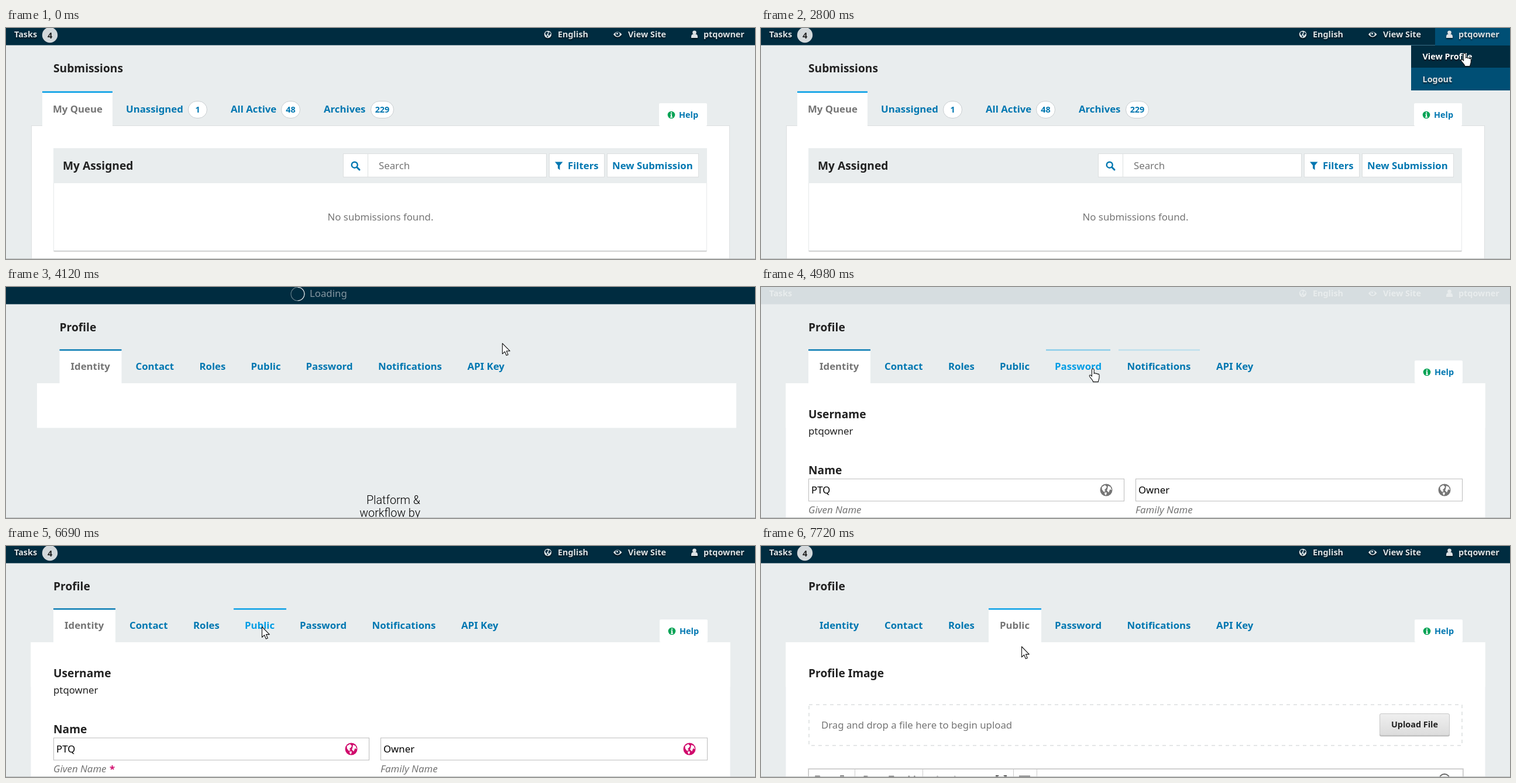
Write an HTML page that moves like this. It is 1280 px wide and 396 px high and loops after 8 s.

```html
<!DOCTYPE html>
<html lang="en">
<head>
<meta charset="utf-8">
<title>Profile settings</title>
<style>
html, body { margin: 0; width: 100%; height: 100%; overflow: hidden; background: #e9edee; }
svg { display: block; width: 1280px; height: 396px; font: 16.8px "Noto Sans", sans-serif; }
text { white-space: pre; }
.b { font-weight: 700; }
.h { font-weight: 700; font-size: 19.2px; fill: #222; }
.s { font-weight: 700; font-size: 14.4px; }
.i { font-style: italic; }
.nav { filter: drop-shadow(0 2px 1px #0009); }
</style>
</head>
<body>
<svg id="stage" viewBox="0 0 1280 396"></svg>
<script>
const LOOP = 8000;
const NAVY = '#002c40', MENU = '#004f75', BLUE = '#0077b1', BRIGHT = '#009de5';
const PAGE = '#e9edee', GREY = '#757575', DARK = '#222', PINK = '#d00a6c', PALE = '#dde2e5';
const USER = 'ptqowner', GIVEN = 'PTQ', FAMILY = 'Owner';

const text = (x, y, s, cls = '', fill = DARK, more = '') =>
  `<text x="${x}" y="${y}" class="${cls}" ${cls === 'h' ? '' : `fill="${fill}"`} ${more}>${s}</text>`;
const rect = (x, y, w, h, fill, more = '') =>
  `<rect x="${x}" y="${y}" width="${w}" height="${h}" fill="${fill}" ${more}/>`;
const path = (d, fill, more = '') => `<path d="${d}" fill="${fill}" ${more}/>`;
const group = (id, inner, more = '') => `<g id="${id}" ${more}>${inner}</g>`;
const outlined = (x, y, w, h, color = '#dcdfe0', fill = '#fff', more = '') =>
  rect(x + .5, y + .5, w - 1, h - 1, fill, `stroke="${color}" ${more}`);

const globe = (x, y, r, fill, land, cls = '') =>
  `<g transform="translate(${x} ${y}) scale(${r / 10})"><circle r="10" fill="${fill}" class="${cls}"/>` +
  path('M-7-5L-2-8 1-5-1-2-3 0-1 2-4 3-7-1ZM3-7L7-5 9 0 6-1 4 4 1 1 2-2ZM-3 4L1 4 0 8-2 8Z', land) + '</g>';

const help = (x, y) => rect(x, y, 82, 39, '#fff', 'rx="2"') +
  `<circle cx="${x + 21}" cy="${y + 20}" r="6.3" fill="#04a355"/>` +
  path(`M${x + 19.5} ${y + 18.5}h2.6v4.6h1v1.6h-4v-1.6h1v-3h-.6ZM${x + 20} ${y + 15.5}h2.2v2h-2.2Z`, '#fff') +
  text(x + 34, y + 25, 'Help', 's', BLUE);

const pill = (x, w, n) => outlined(x, 125, w, 30, '#c9ced1', '#fff', 'rx="14.5"') +
  text(x + w / 2, 145, n, 's', BLUE, 'text-anchor="middle"');

const navItems = text(14, 16, 'Tasks', 's', PALE) +
  globe(926, 11, 6.2, PALE, NAVY) + text(943, 16, 'English', 's', PALE) +
  path('M1038 11Q1045 2 1052.500 11Q1045 20 1038 11Z', PALE) +
  `<circle cx="1045.200" cy="10.500" r="3.600" fill="${NAVY}"/><circle cx="1044.500" cy="9.500" r="1.500" fill="${PALE}"/>` +
  text(1063, 16, 'View Site', 's', PALE) +
  `<circle cx="1176.500" cy="7.800" r="3.300" fill="${PALE}"/>` +
  path('M1171 17v-2q0-4 3-4.500h5q3 .5 3 4.500v2Z', PALE) +
  text(1192, 16, USER, 's', PALE);

const header = group('header', rect(0, 0, 1280, 29.5, NAVY) +
  group('userBg', rect(1152, 0, 128, 30, MENU)) +
  `<g class="nav">${navItems}</g>` +
  group('badge', `<circle cx="75" cy="12" r="13.2" fill="#d3d8db"/>` +
    text(75, 17.5, '4', 's', DARK, 'text-anchor="middle"')));

const menu = group('menu', rect(1111, 29.5, 169, 77.5, MENU) +
  group('menuHover', rect(1111, 30, 169, 38, NAVY)) +
  `<g class="nav">${text(1130.5, 54, 'View Profile', 's', PALE, 'id="viewProfile"')}` +
  text(1130.5, 93, 'Logout', 's', PALE) + '</g>');

const queue = group('queue',
  text(81, 76, 'Submissions', 'h') +
  outlined(43, 167, 1194, 240) +
  rect(62, 109, 120, 60, '#fff') + rect(62, 108.5, 120, 2.5, BRIGHT) +
  text(80, 145, 'My Queue', 'b', GREY) +
  text(205, 145, 'Unassigned', 'b', BLUE) + pill(311, 33, 1) +
  text(384, 145, 'All Active', 'b', BLUE) + pill(470, 33, 48) +
  text(543, 145, 'Archives', 'b', BLUE) + pill(623, 40, 229) +
  help(1116, 129) +
  rect(81, 208, 1117, 175.5, '#ccc', 'rx="2"') +
  outlined(81, 206, 1117, 176, '#e6e9ea') + rect(81, 206, 1117, 60, PAGE) +
  text(97, 243, 'My Assigned', 'h') +
  outlined(576, 215, 348, 41) + rect(618, 216, 1, 39, '#dcdfe0') +
  `<circle cx="595.700" cy="234.700" r="5" fill="none" stroke="${BLUE}" stroke-width="2.400"/>` +
  path('M599.500 238.500l4.500 4.500', 'none', `stroke="${BLUE}" stroke-width="3" stroke-linecap="round"`) +
  text(637, 242, 'Search', '', GREY) +
  outlined(928, 215, 95, 41) +
  path('M938 229.500h13.500l-5 6v8l-3.500-3v-5Z', BLUE) + text(960, 242, 'Filters', 'b', BLUE) +
  outlined(1027, 215, 157, 41) + text(1036, 242, 'New Submission', 'b', BLUE) +
  text(640, 330, 'No submissions found.', '', GREY, 'text-anchor="middle"'));

// name, text x, tab left, tab right
const TABS = [
  ['Identity', 100, 81, 187], ['Contact', 211], ['Roles', 320], ['Public', 408, 389, 479],
  ['Password', 502, 487, 597], ['Notifications', 625.5, 611, 750], ['API Key', 778]
];

const input = (x, w, value, label) => outlined(x, 328.5, w, 39, '#bbb') +
  text(x + 5, 354, value, '', '#000') +
  globe(x + w - 31, 348, 10.5, GREY, '#fff', 'locale') +
  text(x, 388, label, 'i', GREY);

const identity = group('identity',
  text(81, 225, 'Username', 'h') + text(81, 253, USER) + text(81, 321, 'Name', 'h') +
  input(81, 540, GIVEN, 'Given Name') + input(640, 559, FAMILY, 'Family Name') +
  text(177, 388, '*', 'b', PINK, 'id="required"'));

const stroke = 'stroke="#666" stroke-width="1.500"';
const toolbar = group('toolbar',
  rect(80, 381, 1121, 20, '#ddd') + outlined(81, 382, 1119, 30, '#c4c4c4') +
  [160, 276, 431, 471].map(x => rect(x, 383, 1, 13, '#ccc')).join('') +
  path('M93 410v-15.500h7l3 3v12ZM133 410v-13h11v13M136 396v-2h5v2M441 394.500h19M298 399q3-8 8 0M328 399q3-8 7 0M338 399q2-6 6 0', 'none', stroke) +
  path('M401 399v-6h6l-2 2ZM420 399v-6h-6l2 2Z', '#555') +
  text(174, 406, 'B', 'b', '#555') + text(218, 406, 'T', 'b', '#555') + text(250, 406, 'M', '', '#555') +
  `<circle cx="1168" cy="400" r="9" fill="none" stroke="#666" stroke-width="2"/>`);

const upload = group('public',
  text(81, 225, 'Profile Image', 'h') +
  rect(82, 272, 1116, 70, 'none', 'stroke="#e4e6e7" stroke-width="2" stroke-dasharray="6 6"') +
  text(103, 313, 'Drag and drop a file here to begin upload', '', GREY) +
  rect(1057, 288, 120, 38.5, '#bbb', 'rx="3"') +
  outlined(1057, 287, 120, 38, '#c8c8c8', 'url(#button)', 'rx="2.500"') +
  text(1117, 311, 'Upload File', 's', DARK, 'text-anchor="middle"') + toolbar);

const profile = group('profile',
  text(81, 76, 'Profile', 'h') +
  rect(42.5, 165, 1195, 76.5, '#fff') +
  group('loaded', rect(42.5, 165, 1195, 231, '#fff') + help(1117, 126) + identity + upload) +
  TABS.map(([name, x, l, r]) => l ? group('tab' + name,
    rect(l, 107, r - l, 59, '#fff', `class="face"`) + rect(l, 106.8, r - l, 2.4, BRIGHT, 'class="edge"')) : '').join('') +
  TABS.map(([name, x]) => text(x, 142, name, 'b', BLUE, `id="label${name.replace(' ', '')}"`)).join(''));

const loading = group('loading', rect(0, 0, 1280, 29.5, NAVY) +
  `<g id="spinner"><circle r="11.500" fill="none" stroke="#fff" stroke-opacity=".45"/>` +
  path('M0-11.500A11.500 11.500 0 0 1 0 11.500', 'none', 'stroke="#fff" stroke-width="1.200" stroke-opacity=".85"') + '</g>' +
  text(519, 16.5, 'Loading', '', '#8597a1') +
  `<g style="font:300 19.700px Roboto,sans-serif" text-anchor="end">` +
  text(708, 372, 'Platform &amp;', '', '#000') + text(708, 394, 'workflow by', '', '#000') + '</g>');

const outline = 'stroke="#111" stroke-width="1.100" stroke-linejoin="round"';
const cursor = group('cursor',
  path('M.5.500V18.500L4.600 14.700 7.400 21.200 10.300 20 7.500 13.600H13.300Z', '#fff', `id="arrow" ${outline}`) +
  path('M-1.900 13V2a1.900 1.900 0 0 1 3.800 0V8.500c.4-1.600 3-1.400 3.200.3 .6-1.200 2.900-.8 3 .8 .8-1 2.600-.5 2.600 1.200V15c0 3-1.500 4-1.700 7.500H.3C0 19-5 15.500-6 12.800c-.6-1.800 1.600-2.600 2.800-1.200Z',
    '#fff', `id="hand" ${outline}`));

document.getElementById('stage').innerHTML =
  '<defs><linearGradient id="button" x2="0" y2="1"><stop stop-color="#efefef"/><stop offset="1" stop-color="#dcdcdc"/></linearGradient></defs>' +
  rect(0, 0, 1280, 396, PAGE) + queue + profile + header + loading + menu +
  rect(0, 395, 1280, 1, '#bcbfc0') + cursor;

const el = id => document.getElementById(id);
const show = (id, on) => el(id).setAttribute('visibility', on ? 'inherit' : 'hidden');
const clamp = v => Math.max(0, Math.min(1, v));
const between = (t, a, b) => t >= a && t < b;

// pointer path: time, x, y
const POINTER = [
  [580, 1027, 322], [1300, 1184, 60], [1470, 1203, 6], [1620, 1203, 6], [2180, 1205, 52],
  [2330, 1203, 36], [2480, 1203, 43], [2800, 1203, 43], [3500, 928, 91], [3710, 914, 88],
  [4120, 848, 96], [4430, 795, 112], [4800, 690, 130], [4980, 567.5, 140], [5310, 510, 165],
  [5630, 470, 203], [5800, 470, 203], [6290, 437, 138], [7180, 437, 138], [7570, 445, 172]
];
function pointerAt(t) {
  const next = POINTER.findIndex(p => p[0] > t);
  if (next < 1) return POINTER[next ? POINTER.length - 1 : 0].slice(1);
  const [t0, x0, y0] = POINTER[next - 1], [t1, x1, y1] = POINTER[next];
  const k = (t - t0) / (t1 - t0);
  return [x0 + (x1 - x0) * k, y0 + (y1 - y0) * k];
}

const MENU_OPEN = 1390, ITEM_HOVER = 1900, NAVIGATE = 3830, LOADED = 4860, SWITCH = 6850;
const HOVERS = { Notifications: [4650, 4900], Password: [4940, 5200], Public: [6040, SWITCH] };

function draw(t) {
  const onQueue = t < NAVIGATE, waiting = between(t, NAVIGATE, LOADED);
  const open = between(t, MENU_OPEN, NAVIGATE), itemHover = open && t >= ITEM_HOVER;
  const active = t < SWITCH ? 'Identity' : 'Public';

  show('queue', onQueue);
  show('profile', !onQueue);
  show('loading', waiting);
  show('loaded', !onQueue && !waiting);
  if (onQueue || waiting) { show('identity', false); show('public', false); }
  show('menu', open);
  show('userBg', open);
  show('menuHover', itemHover);
  el('viewProfile').setAttribute('fill', itemHover ? '#fff' : PALE);

  const fade = onQueue ? 1 : clamp((t - LOADED) / 690);
  el('header').setAttribute('opacity', fade * fade * (3 - 2 * fade));
  show('badge', onQueue || t >= 5470);
  el('profile').setAttribute('transform', `translate(${waiting ? 10.5 : 0} 0)`);
  el('spinner').setAttribute('transform', `translate(498.5 12) rotate(${(t - 4120) * .36})`);

  if (!onQueue && !waiting) {
    show('identity', active === 'Identity');
    show('public', active === 'Public');
  }
  show('required', t >= 5100 && active === 'Identity');
  show('toolbar', t >= 7720);
  document.querySelectorAll('.locale').forEach(c => c.setAttribute('fill', t < 5880 ? GREY : PINK));

  for (const [name, , left] of TABS) {
    const [from, to] = HOVERS[name] || [LOOP, LOOP];
    const selected = name === active, hovered = between(t, from, to);
    el('label' + name.replace(' ', '')).setAttribute('fill', selected ? GREY : hovered ? BRIGHT : BLUE);
    if (!left) continue;
    const tab = el('tab' + name), edge = tab.querySelector('.edge');
    const glow = clamp((t - from) / 100) * clamp(1 - (t - to) / 100);
    tab.querySelector('.face').setAttribute('opacity', selected ? 1 : 0);
    edge.setAttribute('opacity', selected ? 1 : name === 'Identity' ? 0 : glow);
    edge.setAttribute('fill', name === 'Identity' ? BLUE : BRIGHT);
  }

  const [x, y] = pointerAt(t);
  const hand = between(t, MENU_OPEN, 3020) || between(t, 4650, 5200) || between(t, 6040, 6610);
  show('cursor', t >= 580);
  show('arrow', t >= 580 && !hand);
  show('hand', hand);
  el('cursor').setAttribute('transform', `translate(${x.toFixed(1)} ${y.toFixed(1)})`);
}

function tick() {
  draw(performance.now() % LOOP);
  requestAnimationFrame(tick);
}
tick();
</script>
</body>
</html>
```
